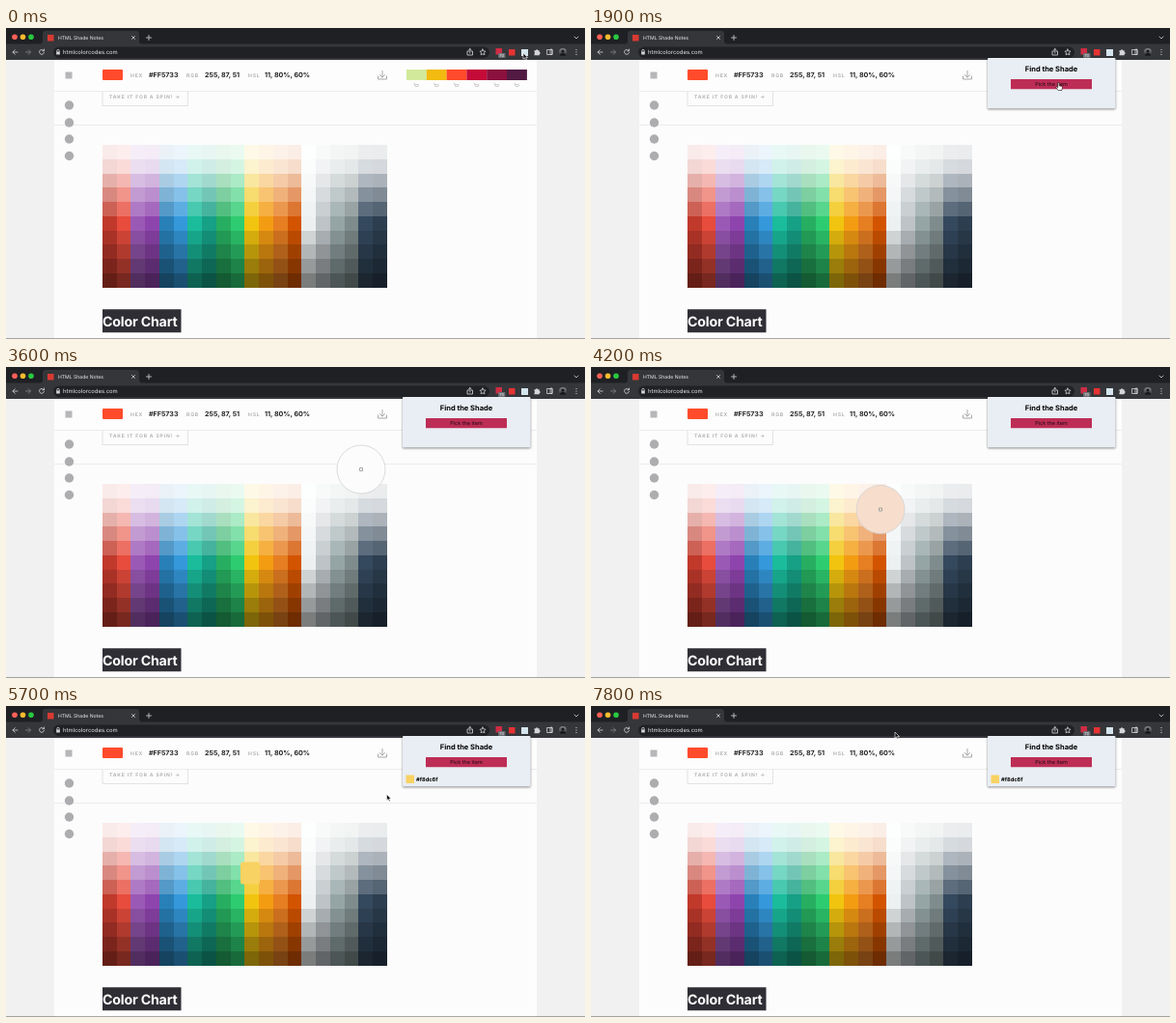
An HTML page that plays this animation: 600 by 322 pixels, repeating every 8000 ms.

```html
<!DOCTYPE html>
<html lang="en">
<head>
<meta charset="utf-8">
<title>Color picker demo</title>
<style>
html, body { margin: 0; width: 100%; height: 100%; overflow: hidden; background: #f1f1f2 }
svg { display: block; width: 100vw; height: 100vh }
text { font-family: Inter, "Liberation Sans", sans-serif; white-space: pre; text-rendering: geometricPrecision }
.label { font-size: 5.2px; font-weight: 600; letter-spacing: .8px; fill: #a9a9ac }
.value { font-size: 7.1px; font-weight: 700; fill: #242427 }
.line { fill: none; stroke-linecap: round; stroke-linejoin: round }
#popup { filter: drop-shadow(0 1px 1px #0007) }
</style>
</head>
<body>
<svg viewBox="0 0 600 322">
  <!-- page -->
  <path fill="#fcfcfc" d="M50 33h500v289H50z"/>
  <path fill="none" stroke="#dcdcde" stroke-width=".8" d="M100 62h88.500v18.500H100z"/>
  <text x="107" y="73" font-size="5" font-weight="700" letter-spacing=".85" fill="#b2b2b5">TAKE IT FOR A SPIN! →</text>
  <path fill="#fdfdfd" d="M50 33h500v32H50z"/>
  <path stroke="#e9e9eb" stroke-width=".8" d="M50 65.500h500M50 100.500h500"/>
  <rect x="61.500" y="45.500" width="7" height="7" fill="#b6b6b9"/>
  <g id="social" fill="#adadb0"></g>
  <rect x="100" y="43" width="21" height="11" rx="1" fill="#ff4b2b"/>
  <text class="label" x="129" y="50.700">HEX</text><text class="value" x="148" y="51">#FF5733</text>
  <text class="label" x="187" y="50.700">RGB</text><text class="value" x="206" y="51">255, 87, 51</text>
  <text class="label" x="251" y="50.700">HSL</text><text class="value" x="268" y="51">11, 80%, 60%</text>
  <path class="line" stroke="#a8a8ab" d="M390 44.500v6.500m-2.500-2.500 2.500 2.500 2.500-2.500M385.500 50v3h9v-3"/>
  <g id="palette"></g>
  <g id="chart" shape-rendering="crispEdges"></g>
  <path fill="#302e35" d="M100 291.300h81.500v24H100z"/>
  <text x="100" y="308.500" font-size="14.200" font-weight="700" letter-spacing="-.2" fill="#fff">Color Chart</text>
  <path fill="#555" d="M0 321.400h600v.6H0z"/>

  <!-- browser -->
  <path fill="#1f2023" d="M0 0h600v18H0z"/>
  <path fill="#35363a" d="M0 16.500h35q3 0 3-3V6q0-3 3-3h94q3 0 3 3v7.500q0 3 3 3h459V33H0z"/>
  <circle cx="9" cy="9.300" r="2.800" fill="#fe5f57"/>
  <circle cx="17.500" cy="9.300" r="2.800" fill="#febc2e"/>
  <circle cx="26" cy="9.300" r="2.800" fill="#28c840"/>
  <rect x="43" y="7" width="6.500" height="6.500" fill="#d93a32"/>
  <text x="54" y="12" font-size="5.100" fill="#eee">HTML Shade Notes</text>
  <rect x="49" y="19.500" width="452" height="11.500" rx="5.700" fill="#202124"/>
  <text x="59" y="27.200" font-size="5.900" fill="#e8eaed">htmlcolorcodes.com</text>
  <g class="line" stroke="#d5d6d9" stroke-width=".8">
    <path d="m130.500 8.500 3 3m0-3-3 3M145.500 10h5m-2.500-2.500v5M589 9l2 2 2-2"/>
    <path d="M12 25H7m2.300-2.300L7 25l2.300 2.300"/>
    <path stroke="#85868a" d="M20.500 25h5m-2.300-2.300 2.300 2.300-2.300 2.300"/>
    <path d="M39.200 23.500a2.500 2.500 0 1 0 .3 2M39.500 22v1.800h-1.800"/>
    <path d="M52.800 24.500v-1a1.200 1.200 0 0 1 2.400 0v1"/>
    <path d="M479.500 24H478v4h5.500v-4H482M480.800 26v-4.500m-1.300 1.300 1.300-1.300 1.300 1.300"/>
    <path d="m494 22 .9 1.900 2.100.3-1.500 1.500.4 2.100-1.900-1-1.900 1 .4-2.100-1.500-1.500 2.100-.3z"/>
    <path d="M561 22.500h5v5h-5zM564 22.500v5h2v-5z"/>
  </g>
  <path fill="#d5d6d9" d="M52.200 24.500h3.600v3h-3.600zM547.500 23.300h1.600a1 1 0 0 1 2 0h1.600v1.600a1 1 0 0 1 0 2v1.300h-5.200v-1.500a1 1 0 0 0 0-1.800z"/>
  <rect x="507.500" y="21" width="6.500" height="6.500" fill="#d02c44"/>
  <rect x="510" y="26" width="7.500" height="5" rx="1" fill="#6d6e73"/>
  <text x="513.700" y="30" font-size="4" text-anchor="middle" fill="#fff">70</text>
  <rect x="521" y="22" width="6.500" height="6.500" fill="#e53232"/>
  <rect x="534" y="22" width="7" height="7" fill="#d5e5ee"/>
  <defs><linearGradient id="photo" x2="0" y2="1"><stop stop-color="#89898d"/><stop offset="1" stop-color="#242529"/></linearGradient></defs>
  <circle cx="577" cy="25" r="4" fill="url(#photo)"/>
  <path fill="#151619" d="M574 28.500q0-2.500 3-2.500t3 2.500zM575.500 24a1.500 1.500 0 1 1 3 0 1.500 1.500 0 1 1-3 0"/>
  <path fill="#d5d6d9" d="M590.500 22h1v1h-1zm0 2.500h1v1h-1zm0 2.500h1v1h-1z"/>

  <!-- extension popup -->
  <g id="popup">
    <rect x="411" y="31" width="132.500" height="52.300" rx="1" fill="#e9eef4"/>
    <text x="477" y="45.200" font-size="7.500" font-weight="700" text-anchor="middle">Find the Shade</text>
    <path fill="#bd2d55" d="M435 53h84v10.300h-84z"/>
    <text x="477" y="60" font-size="5.500" text-anchor="middle" fill="#1b0a10">Pick the item</text>
    <g id="result">
      <path fill="#f8d262" d="M414.500 71.500h8.500V80h-8.500z"/>
      <text x="425" y="77.900" font-size="5.700" font-weight="700">#f8dc6f</text>
    </g>
  </g>

  <rect id="patch" x="243" y="161.500" width="20" height="23" rx="2.500" fill="#f8d262"/>
  <g id="loupe">
    <circle r="25" stroke="#d2d2d4" stroke-width=".8"/>
    <path fill="none" stroke="#8f9594" stroke-width=".8" d="M-1.500-1.500h3v3h-3z"/>
  </g>
  <path id="arrow" fill="#111" stroke="#fff" stroke-width=".6" d="M0 0v6.200l1.500-1.300 1.100 2.400 1.100-.5-1.100-2.300h2z"/>
  <path id="hand" fill="#fff" stroke="#111" stroke-width=".6" stroke-linejoin="round" d="M-.7.500q.7-1 1.400 0v2.800l2.600.6q.8.300.7 1.300L3.400 8H-.4l-2.300-3.200q.3-.9 1.200-.3l.8.700z"/>
</svg>
<script>
const $ = id => document.getElementById(id);
const rect = (x, y, w, h, fill) =>
  `<rect x="${x}" y="${y}" width="${w}" height="${h}" fill="${fill}"/>`;

const bases = ('c0392b e74c3c 9b59b6 8e44ad 2980b9 3498db 1abc9c 16a085 27ae60 2ecc71 ' +
  'f1c40f f39c12 e67e22 d35400 ecf0f1 bdc3c7 95a5a6 7f8c8d 34495e 2c3e50').split(' ');
const tints = [.9, .8, .6, .4, .2, 0, -.12, -.24, -.36, -.48];
const CELL = 14.75, LEFT = 99.8, TOP = 121.2;

// Positive amounts mix with white, negative with black.
function shade(hex, amount) {
  const mix = [0, 2, 4].map(i => {
    const c = parseInt(hex.slice(i, i + 2), 16);
    return Math.round(amount > 0 ? c + (255 - c) * amount : c * (1 + amount));
  });
  return `rgb(${mix})`;
}

$('chart').innerHTML = bases.map((hex, c) => tints.map((amount, r) =>
  rect(LEFT + c * CELL, TOP + r * CELL, CELL, CELL, shade(hex, amount))).join('')).join('');

$('palette').innerHTML = ['d2e99b', 'f3ba10', 'ff4b2b', 'c40a39', '8a103d', '511b43']
  .map((hex, i) => rect(415 + i * 20.8, 43, 20.9, 11, '#' + hex) +
    `<path class="line" stroke="#c4c4c7" stroke-width=".8" d="M${423 + i * 20.8} 57l1 3.500h3l.5-2h-4"/>`).join('');

$('social').innerHTML = [80, 98, 115, 132.5].map(y => `<circle cx="65.500" cy="${y}" r="4.700"/>`).join('');

// time, x, y of the pointer
const path = [
  [0, 536, 26], [400, 536, 26], [1100, 502, 47], [1200, 502, 47], [1900, 484.5, 56.5],
  [2300, 483, 57], [2900, 483, 57], [3600, 368, 106], [3800, 345, 120], [4600, 255, 175],
  [5300, 255, 175], [5700, 394.5, 91.5], [5800, 398, 88], [6300, 378, 74], [6600, 374, 70],
  [7000, 334, 41.5], [7500, 317, 29], [7800, 315, 27], [8000, 315, 27]
];

function pointer(t) {
  const i = path.findIndex(p => p[0] > t);
  const [t0, x0, y0] = path[i - 1], [t1, x1, y1] = path[i];
  const k = (t - t0) / (t1 - t0);
  return [x0 + (x1 - x0) * k, y0 + (y1 - y0) * k];
}

const inside = (x, y, l, t, r, b) => x >= l && x < r && y >= t && y < b;
const onButton = (x, y) => inside(x, y, 435, 53, 519, 63.3);

function colorAt(x, y) {
  if (onButton(x, y)) return '#bd2d55';
  if (inside(x, y, 411, 31, 543.5, 83.3)) return '#e9eef4';
  const c = Math.floor((x - LEFT) / CELL), r = Math.floor((y - TOP) / CELL);
  if (c === 10 && r === 3) return '#f8d262';
  return inside(c, r, 0, 0, 20, 10) ? shade(bases[c], tints[r]) : '#fcfcfc';
}

function show(id, on) { $(id).style.display = on ? '' : 'none'; }

function draw(now) {
  const t = Math.floor(now % 8000 / 100) * 100;
  const [x, y] = pointer(t);
  const picking = t >= 2700 && t < 5400;
  const pressing = !picking && t > 300 && t < 2700 && onButton(x, y);
  show('popup', t >= 200);
  show('result', t >= 5400);
  show('patch', t >= 5400 && t < 5900);
  show('loupe', picking);
  show('hand', pressing);
  show('arrow', !picking && !pressing);
  for (const id of ['loupe', 'hand', 'arrow'])
    $(id).setAttribute('transform', `translate(${x} ${y})`);
  $('loupe').firstElementChild.setAttribute('fill', colorAt(x, y));
  requestAnimationFrame(() => draw(performance.now() - start));
}

const start = performance.now();
draw(0);
</script>
</body>
</html>
```
